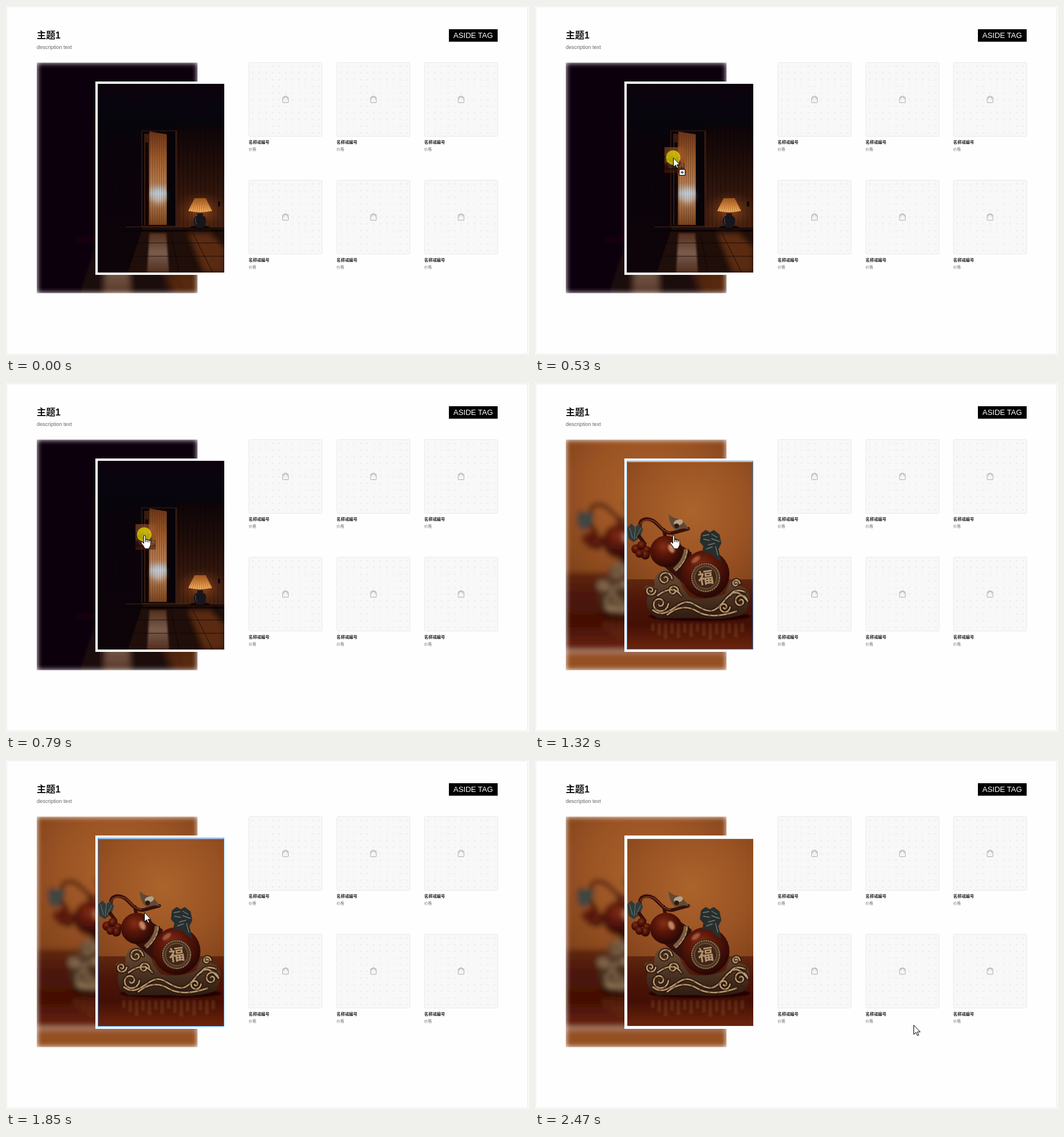
Animation, 901 px wide and 601 px high, one loop 2540 ms. Source, as an HTML page:

```html
<!DOCTYPE html>
<html lang="zh">
<head>
<meta charset="utf-8">
<style>
html, body { margin: 0; width: 100%; height: 100%; overflow: hidden; background: #fbfbfb; }
svg { display: block; width: 901px; height: 601px; font-family: "Liberation Sans", "Noto Sans CJK SC", "Noto Sans CJK", sans-serif; }
</style>
</head>
<body>
<svg viewBox="0 0 901 601" xmlns="http://www.w3.org/2000/svg">
<defs>
  <clipPath id="backClip"><rect x="53" y="97.5" width="277" height="397"/></clipPath>
  <clipPath id="photoClip"><rect x="158" y="134" width="218" height="325"/></clipPath>
  <clipPath id="insetClip"><rect x="159" y="136" width="217" height="322"/></clipPath>
  <filter id="soft" filterUnits="userSpaceOnUse" x="20" y="60" width="350" height="480"><feGaussianBlur stdDeviation="5"/></filter>
  <filter id="haze" x="-50%" y="-50%" width="200%" height="200%"><feGaussianBlur stdDeviation="5"/></filter>
  <filter id="fuzz" x="-50%" y="-50%" width="200%" height="200%"><feGaussianBlur stdDeviation="1.6"/></filter>
  <linearGradient id="night" x2="0" y2="1">
    <stop offset="0" stop-color="#0d020d"/><stop offset=".12" stop-color="#08050e"/>
    <stop offset=".22" stop-color="#07050c"/><stop offset=".34" stop-color="#0b030a"/><stop offset="1" stop-color="#0c030b"/>
  </linearGradient>
  <linearGradient id="sideWall" x2="0" y2="1">
    <stop offset="0" stop-color="#0d0408"/><stop offset=".4" stop-color="#210e09"/><stop offset="1" stop-color="#45200f"/>
  </linearGradient>
  <linearGradient id="door" x2="0" y2="1">
    <stop offset="0" stop-color="#6b3517"/><stop offset=".3" stop-color="#a3602f"/><stop offset=".55" stop-color="#b98055"/>
    <stop offset=".66" stop-color="#b7bec4"/><stop offset=".76" stop-color="#b17b4e"/><stop offset="1" stop-color="#7c441f"/>
  </linearGradient>
  <linearGradient id="shade" x2="0" y2="1">
    <stop offset="0" stop-color="#a85d22"/><stop offset=".6" stop-color="#dd9245"/><stop offset="1" stop-color="#f2b565"/>
  </linearGradient>
  <radialGradient id="lampGlow"><stop offset="0" stop-color="#a65320" stop-opacity=".85"/><stop offset="1" stop-color="#5a2a12" stop-opacity="0"/></radialGradient>
  <linearGradient id="mirror" x2="0" y2="1">
    <stop offset="0" stop-color="#5b3320"/><stop offset=".5" stop-color="#8a6a58"/><stop offset="1" stop-color="#5a3524"/>
  </linearGradient>
  <radialGradient id="wall" gradientUnits="userSpaceOnUse" cx="270" cy="220" r="180">
    <stop offset="0" stop-color="#ac642c"/><stop offset=".55" stop-color="#995223"/><stop offset="1" stop-color="#7c4019"/>
  </radialGradient>
  <linearGradient id="table" x2="0" y2="1">
    <stop offset="0" stop-color="#5f270f"/><stop offset=".3" stop-color="#4c1608"/><stop offset=".65" stop-color="#430f05"/><stop offset="1" stop-color="#6c250b"/>
  </linearGradient>
  <radialGradient id="lacquer" cx=".42" cy=".34" r=".7">
    <stop offset="0" stop-color="#842d17"/><stop offset=".4" stop-color="#591609"/><stop offset="1" stop-color="#220604"/>
  </radialGradient>
  <linearGradient id="bronze" x2="0" y2="1"><stop offset="0" stop-color="#6d4e36"/><stop offset="1" stop-color="#2f1b11"/></linearGradient>

  <g id="room">
    <rect x="158" y="134" width="218" height="325" fill="url(#night)"/>
    <rect x="294" y="205" width="82" height="176" fill="url(#sideWall)"/>
    <g id="planks" stroke="#0b0407" stroke-opacity=".45"/>
    <ellipse cx="336" cy="352" rx="48" ry="34" fill="url(#lampGlow)"/>
    <rect x="158" y="380" width="218" height="79" fill="#0d040a"/>
    <path d="M236 380H376V459H210Z" fill="#1f0e09"/>
    <path d="M234 215H294V379H234Z" fill="#070307" stroke="#402015" stroke-width="1.2"/>
    <rect x="238" y="220" width="9" height="157" fill="#3a1b0e"/>
    <rect x="240" y="235" width="5" height="142" fill="#0f0507"/>
    <path d="M247 216L277 221V377H247Z" fill="url(#door)"/>
    <g id="slats" stroke="#512711" stroke-opacity=".6" stroke-width=".9"/>
    <ellipse cx="263" cy="327" rx="12" ry="14" fill="#cfe2ee" opacity=".5" filter="url(#haze)"/>
    <path d="M292.500 216V379" stroke="#4b2516"/>
    <path d="M206 380.500H376" stroke="#54301d" opacity=".7"/>
    <path d="M196 387H376" stroke="#080304" stroke-width="3"/>
    <path d="M247 391H276L281 459H243Z" fill="url(#mirror)" opacity=".85" filter="url(#fuzz)"/>
    <path d="M313 391H352L376 415V459H340Z" fill="#7a3a18" opacity=".65" filter="url(#haze)"/>
    <path d="M232 391L203 459M284 391L298 459M322 391L356 459M206 408H376M190 431H376" stroke="#090304" stroke-opacity=".75" fill="none"/>
    <ellipse cx="334" cy="381" rx="17" ry="3" fill="#100508"/>
    <path d="M329 357H340L339 361C349 365 344 377 340 382H328C324 377 319 365 330 361Z" fill="#17161d"/>
    <path d="M327 365Q325 370 328 376" stroke="#555365" fill="none"/>
    <path d="M325 331H344L355 353Q334 357 314 353Z" fill="url(#shade)"/>
    <g id="pleats" stroke="#84451a" stroke-opacity=".7" stroke-width=".8"/>
    <rect x="365" y="337" width="4" height="8" fill="#100506"/>
  </g>

  <g id="gourd">
    <rect x="128" y="134" width="290" height="325" fill="url(#wall)"/>
    <rect x="128" y="338" width="290" height="121" fill="url(#table)"/>
    <path d="M128 338H418" stroke="#73300f" stroke-width="3" filter="url(#fuzz)"/>
    <g id="gleams" stroke="#9c5d35" stroke-opacity=".28" stroke-width="6" filter="url(#fuzz)"/>
    <ellipse cx="284" cy="402" rx="88" ry="8" fill="#230603" filter="url(#fuzz)"/>
    <path d="M188 352Q194 345 206 350C203 328 219 318 236 324Q248 332 254 352L266 368Q294 377 327 363L336 342Q346 331 354 341L352 350Q369 352 370 372Q368 390 358 399Q326 409 282 405H212Q187 394 194 367Z" fill="url(#bronze)"/>
    <path d="M181 250C178 233 193 232 203 237S222 262 238 258L264 251M222 253L225 268" fill="none" stroke="#35100a" stroke-width="6" stroke-linecap="round"/>
    <path d="M180 246C183 235 193 234 203 237S220 259 234 257" fill="none" stroke="#84391f" stroke-width="1.500"/>
    <path d="M230 226Q236 231 241 233Q252 234 256 240L266 252Q253 248 244 254Q232 248 230 226Z" fill="#604a36"/>
    <ellipse cx="247" cy="240" rx="8" ry="5" fill="#b4a287" transform="rotate(-15 247 240)"/>
    <circle cx="244" cy="246" r="4" fill="#30160d"/>
    <path d="M159 249L166 242L172 248L180 243L186 252L181 266L170 274L161 268Z" fill="#303a39"/>
    <path d="M163 249L168 267M173 247L171 269M182 250L174 267" stroke="#687872" fill="none"/>
    <path d="M178 262L190 278" stroke="#35100a" stroke-width="6"/>
    <g id="berries" fill="url(#lacquer)"/>
    <path d="M232 266L270 292L262 350L222 316Z" fill="#35100a"/>
    <circle cx="294" cy="329" r="41" fill="url(#lacquer)"/>
    <ellipse cx="226" cy="290" rx="28" ry="27" fill="url(#lacquer)"/>
    <ellipse cx="235" cy="285" rx="5" ry="8" fill="#e3aa82" opacity=".75" filter="url(#fuzz)" transform="rotate(-25 235 285)"/>
    <ellipse cx="277" cy="304" rx="9" ry="4" fill="#d58a66" opacity=".55" filter="url(#fuzz)" transform="rotate(-38 277 304)"/>
    <path d="M260 286Q259 306 240 322" fill="none" stroke="#2a150d" stroke-width="11"/>
    <path d="M260 286Q259 306 240 322" fill="none" stroke="#7d5c40" stroke-width="7"/>
    <path d="M262 288Q261 307 243 323" fill="none" stroke="#c0a079" stroke-width="1.500" stroke-dasharray="7 2"/>
    <path d="M286 259L294 253L301 257L308 253L318 261L321 276L316 286L321 308L312 302L302 293L288 291L290 281L284 274Z" fill="#272e2d"/>
    <path d="M289 263L300 261M290 269L301 271M304 260L314 266M304 268L318 273M298 279L310 276M295 286L306 282M311 281L315 297" stroke="#6e7b75" stroke-width="1.400"/>
    <circle cx="294" cy="335" r="26" fill="#2d170f"/>
    <circle cx="294" cy="335" r="24" fill="#4f3523" stroke="#94744f" stroke-width="2" stroke-dasharray="3 1"/>
    <circle cx="294" cy="335" r="19" fill="#402618" stroke="#86664a"/>
    <text x="294" y="345" font-size="27" font-weight="700" fill="#b4946f" text-anchor="middle" transform="rotate(-8 294 335)">福</text>
    <g fill="none" stroke-linecap="round">
      <g id="curlShade" stroke="#1f0f09" stroke-width="6"/>
      <g id="curlBody" stroke="#80603f" stroke-width="3.500"/>
      <g id="curlLight" stroke="#d2b48c" stroke-width="1.200" stroke-dasharray="11 5"/>
    </g>
  </g>
</defs>

<rect width="901" height="601" fill="#fafafa"/>
<rect x="1.500" y="1.500" width="897" height="597.500" rx="2" fill="#fefefe" stroke="#ececec"/>
<text x="53" y="56" font-size="16" font-weight="700" fill="#111">主题1</text>
<text x="53" y="74" font-size="9" fill="#666">description text</text>
<rect x="763" y="40" width="84" height="21.500"/>
<text x="804.800" y="55" font-size="13" fill="#fff" text-anchor="middle">ASIDE TAG</text>
<g id="cards"></g>

<g clip-path="url(#backClip)">
  <rect x="53" y="97" width="277" height="398" fill="#fff"/>
  <g filter="url(#soft)"><g clip-path="url(#backClip)">
    <g id="backRoom">
      <rect x="53" y="97" width="277" height="398" fill="#0b020c"/>
      <use href="#room" transform="translate(59 88) scale(1.276) translate(-158 -134)"/>
    </g>
    <g id="backGourd">
      <use href="#gourd" transform="translate(71 97) scale(1.123) translate(-158 -134)"/>
      <rect x="53" y="461" width="277" height="36" fill="#945022"/>
      <rect x="53" y="460" width="277" height="4" fill="#c29a80"/>
    </g>
  </g></g>
</g>
<rect x="154" y="130" width="222" height="333" fill="#fff"/>
<g clip-path="url(#photoClip)">
  <use id="frontRoom" href="#room"/>
  <rect id="blank" x="158" y="134" width="218" height="325" fill="#f5f6fb"/>
</g>
<g id="frontGourd">
  <rect x="159" y="135" width="217" height="1" fill="#eee9e6"/>
  <g clip-path="url(#insetClip)"><use href="#gourd"/></g>
</g>
<rect id="outline" x="158.500" y="134.500" width="217" height="324" fill="none" stroke="#2c92fb"/>

<g id="thumb" opacity=".6">
  <g transform="scale(.1606 .1354) translate(-158 -134)"><g clip-path="url(#photoClip)"><use href="#gourd"/></g></g>
</g>
<circle id="halo" r="12.500" fill="#ff0" opacity=".6"/>
<g id="pointer">
  <path id="arrow" d="M.5 .7V16.500L4.200 13L6.800 18.700L9.100 17.700L6.600 12.200H11.600Z" fill="#fff" stroke="#000"/>
  <g id="badge">
    <rect x="2.500" y="17.500" width="12" height="6" fill="none" stroke="#000" stroke-dasharray="1 1"/>
    <rect x="10.500" y="20.500" width="10" height="10" fill="#fff" stroke="#000"/>
    <path d="M13 25.500H18M15.500 23V28" stroke="#000"/>
  </g>
  <path id="hand" transform="translate(-6 1)" d="M5.200 2C5.200 0 8.300 0 8.300 2V8.500C8.300 6.800 11.200 7 11.200 8.800C11.200 7.400 14.200 7.600 14.200 9.400C14.200 8.200 17.300 8.400 17.300 10.400V16C17.300 18.500 15.800 19.500 15.300 21L14 23.300H7.500L6 21C5 18.500 2.500 17 1 13.800C.3 11.600 2.600 10.600 4 12.400L5.200 14ZM8.300 8.500V12M11.200 9V12M14.200 9.500V12.500" fill="#fff" stroke="#1a0c08" stroke-width="1.100" stroke-linejoin="round"/>
</g>
</svg>
<script>
const $ = id => document.getElementById(id);
const repeat = (n, make) => Array.from({ length: n }, (_, i) => make(i)).join("");
const line = (x1, y1, x2, y2) => `<path d="M${x1} ${y1}L${x2} ${y2}"/>`;

function card(i) {
  const x = [418, 569.5, 720.5][i % 3], y = i < 3 ? 97 : 299.5;
  const dots = repeat(121, k =>
    `<circle cx="${7 + k % 11 * 11.4}" cy="${7 + Math.floor(k / 11) * 11.45}" r=".9"/>`);
  const tint = i % 3 ? "#f6f6f6" : "#eff4f7";
  return `<g transform="translate(${x} ${y})">
    <rect x=".5" y=".5" width="126" height="127" rx="2" fill="#f8f8f8" stroke="#e8e8e8"/>
    <g fill="#dedede">${dots}</g>
    <rect x="58.500" y="60" width="10" height="9.500" rx="1" fill="${tint}" stroke="#adadad"/>
    <path d="M60.500 63.500V60.500Q60.500 58 63.500 58T66.500 60.500V63.500" fill="none" stroke="#adadad"/>
    <text x="0" y="140.300" font-size="7.200" font-weight="700" fill="#222">名称或编号</text>
    <text x="0" y="152.300" font-size="6.500" fill="#777">价格</text>
  </g>`;
}

function spiral([cx, cy, r, dir]) {
  const pts = Array.from({ length: 22 }, (_, i) => {
    const a = i * .42 * dir, d = r * (1 - i / 25);
    return `${(cx + d * Math.cos(a)).toFixed(1)} ${(cy + d * Math.sin(a)).toFixed(1)}`;
  });
  return `<path d="M${pts.join("L")}"/>`;
}

$("cards").innerHTML = repeat(6, card);
$("planks").innerHTML = repeat(11, i => line(298 + i * 7.5, 205, 298 + i * 7.5, 380));
$("slats").innerHTML = repeat(8, i => line(249 + i * 3.8, 217 + i * .6, 249 + i * 3.8, 377));
$("pleats").innerHTML = repeat(10, i => line(326 + i * 1.9, 331, 317 + i * 4, 354));
$("gleams").innerHTML = repeat(15, i => line(203 + i * 11, 414, 203 + i * 11, 427 + i * 7 % 16));
$("berries").innerHTML = [[174, 286, 8], [184, 280, 8], [193, 288, 7], [190, 296, 8], [180, 294, 7]]
  .map(([x, y, r]) => `<circle cx="${x}" cy="${y}" r="${r}"/>`).join("");

const waves = "M203 391C230 412 247 366 272 380S306 401 326 375S356 365 366 375M228 399Q254 378 279 393T347 393M211 366Q238 346 252 366M336 366Q344 352 362 360";
const curls = [
  [199, 357, 9, 1], [224, 337, 12, -1], [215, 380, 15, 1], [238, 358, 9, -1],
  [346, 345, 7, -1], [326, 386, 10, 1], [354, 376, 12, -1]
].map(spiral).join("") + `<path d="${waves}"/>`;
for (const id of ["curlShade", "curlBody", "curlLight"]) $(id).innerHTML = curls;

const show = (id, on) => $(id).style.display = on ? "" : "none";
const move = (id, x, y) => $(id).setAttribute("transform", `translate(${x} ${y})`);
const LOOP = 2540;

function draw(t) {
  const dropped = t >= 1060, loaded = t >= 1320;
  const dragging = t >= 270 && !dropped;
  const isHand = t >= 790 && t < 1850;

  show("backRoom", !dropped);
  show("frontRoom", !dropped);
  show("backGourd", dropped);
  show("blank", dropped && !loaded);
  show("frontGourd", loaded);
  show("outline", loaded && t < 2470);
  $("outline").setAttribute("opacity", t < 2400 ? 1 : .5);

  const [x, y] = t < 530 ? [393, 231] : t < 2120 ? [238, 261] : t < 2400 ? [379, 298] : [652, 456];
  show("thumb", dragging);
  show("halo", dragging);
  show("pointer", t >= 270);
  show("arrow", !isHand);
  show("badge", t < 790);
  show("hand", isHand);
  move("thumb", t < 530 ? 411 : 223, t < 530 ? 205 : 243);
  move("halo", x, y);
  move("pointer", x, y + (t >= 1850 && t < 2120 ? 1 : 0));
}

let start;
function tick(now) {
  start ??= now;
  draw((now - start) % LOOP);
  requestAnimationFrame(tick);
}
draw(0);
requestAnimationFrame(tick);
</script>
</body>
</html>
```
